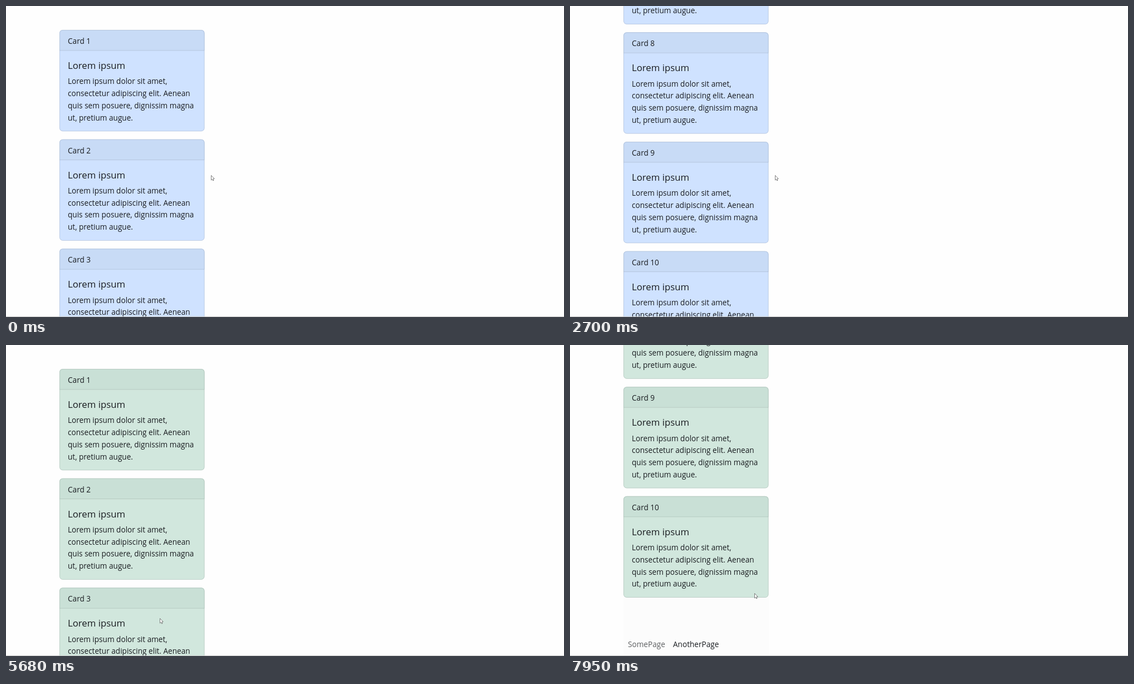
An HTML page that plays this animation: 1002 by 559 pixels, repeating every 8000 ms.

```html
<!DOCTYPE html>
<html lang="en">
<head>
<meta charset="utf-8">
<title>Scrolling cards</title>
<style>
  html, body { margin: 0; width: 100%; height: 100%; overflow: hidden; background: #fefefe; }
  svg { display: block; width: 1002px; height: 559px; font: 13.6px "Open Sans", "Noto Sans", sans-serif; }
  text { fill: #191c20; white-space: pre; }
  .title { font-size: 16.8px; }
  .body { fill: #cfe2ff; }
  .head { fill: #c8dbf6; }
  .green .body { fill: #d1e7dd; }
  .green .head { fill: #c9e0d6; }
  .edge { fill: none; stroke: #000; stroke-opacity: .16; stroke-width: .7; }
  #pointer path { fill: #fff; stroke: #606060; stroke-width: .8; stroke-linejoin: round; }
  #status text { font-size: 8.9px; fill: #fff; }
</style>
</head>
<body>
<svg viewBox="0 0 1002 559">
  <g id="page">
    <g id="footer">
      <rect x="96" y="-89" width="261" height="106" fill="#fcfcfc"/>
      <text x="104">SomePage</text>
      <text x="185">AnotherPage</text>
    </g>
    <g id="cards"></g>
  </g>
  <rect y="558" width="1002" height="1" fill="#c6c6c6"/>
  <g id="status">
    <path d="M0 546H122Q125 546 125 549V559H0Z" fill="#4a4a4a"/>
    <text x="3" y="557.5">devserver:8040/secondsheet</text>
  </g>
  <g id="pointer">
    <path id="arrow" d="M.5 .5V9L2.4 7.4 3.8 10 5 9.4 3.8 6.8 6.2 6.4Z"/>
    <path id="hand" d="M.5 .8Q1.5 -.4 2.2 .8V4L5.2 4.8Q6.4 5.2 6.2 6.6L5.4 10.4H1.4L-1.4 6.8Q-1.2 5.6 .5 6.8Z"/>
    <path id="beam" d="M0 .5H4M2 .5V9.5M0 9.5H4"/>
  </g>
</svg>
<script>
const LOOP = 8000, STEP = 135;
const CARD_TOP = 43, CARD_PITCH = 196.65, LINE_HEIGHT = 21.7, BOTTOM = 1541;
const HOVER = 4000, SWITCH = 4670, SCROLLED = 4790, LEAVE = 5440;

const linear = p => p;
const easeOut = p => 1 - (1 - p) ** 2;
const move = (start, end, from, to, ease = linear) => ({ start, end, from, to, ease });

const scrollMoves = [
  move(810, 1080, [37], [276.5]),
  move(1080, 2010, [276.5], [874.5]),
  move(2010, 2700, [874.5], [1372.2]),
  move(2700, 3000, [1372.2], [BOTTOM]),
  move(SWITCH, 5290, [817.2], [0], easeOut),
  move(6230, 6860, [66], [966]),
  move(7170, 7550, [1060], [BOTTOM])
];
const pointerMoves = [
  move(3370, 3850, [362, 314], [235, 518]),
  move(HOVER, 4360, [233, 527], [231, 536]),
  move(LEAVE, 5680, [237, 530], [276, 491]),
  move(5830, 6080, [312, 462], [396, 401]),
  move(7950, LOOP, [331, 446], [331, 446])
];
const statusMoves = [
  move(HOVER, 4240, [0], [1]),
  move(SWITCH, SCROLLED, [.45], [0])
];

// The latest move that has begun, advanced in held steps of about STEP ms.
function valueAt(moves, t, rest) {
  const current = moves.findLast(m => m.start <= t);
  if (!current) return rest;
  const { start, end, from, to, ease } = current;
  const count = Math.max(1, Math.round((end - start) / STEP));
  const progress = ease(Math.min(1, Math.floor((t - start) / (end - start) * count) / count));
  return from.map((v, i) => v + (to[i] - v) * progress);
}

const byId = id => document.getElementById(id);
const label = (y, text, cls = "") => `<text x="111" y="${y}" class="${cls}">${text}</text>`;
const lines = [
  "Lorem ipsum dolor sit amet,",
  "consectetur adipiscing elit. Aenean",
  "quis sem posuere, dignissim magna",
  "ut, pretium augue."
];
const cardMarkup = n => `<g>
  <rect class="body" x="96" width="260.5" height="182.2" rx="6"/>
  <path class="head" d="M96 37V6Q96 0 102 0H350.5Q356.5 0 356.5 6V37Z"/>
  <path class="edge" d="M96.5 37H356"/>
  <rect class="edge" x="96.4" y=".4" width="259.7" height="181.4" rx="5.6"/>
  ${label(25, "Card " + n)}${label(70, "Lorem ipsum", "title")}
  ${lines.map((text, i) => label(97.4 + LINE_HEIGHT * i, text)).join("")}</g>`;

byId("cards").innerHTML = Array.from({ length: 10 }, (_, i) => cardMarkup(i + 1)).join("");
const cards = [...byId("cards").children];
const [someLink, anotherLink] = byId("footer").querySelectorAll("text");
const shapes = [...byId("pointer").children];

const place = (el, x, y) => el.setAttribute("transform", `translate(${x} ${y})`);

function pointerShape(t) {
  if (t < HOVER || t >= LEAVE) return "arrow";
  return t < SCROLLED ? "hand" : "beam";
}

function draw(t) {
  const [scroll] = valueAt(scrollMoves, t, [0]);
  cards.forEach((card, i) => place(card, 0, CARD_TOP + CARD_PITCH * i - scroll));
  place(byId("footer"), 0, BOTTOM + 543 - scroll);

  const switched = t >= SWITCH;
  byId("page").classList.toggle("green", switched);
  someLink.style.fillOpacity = switched ? .7 : 1;
  anotherLink.style.fillOpacity = switched ? 1 : t >= HOVER ? .82 : .7;

  place(byId("pointer"), ...valueAt(pointerMoves, t, [368, 304]));
  const shape = pointerShape(t);
  shapes.forEach(el => el.style.display = el.id === shape ? "" : "none");
  byId("status").style.opacity = valueAt(statusMoves, t, [0])[0];
}

const start = performance.now();
function tick() {
  draw((performance.now() - start) % LOOP);
  requestAnimationFrame(tick);
}
tick();
</script>
</body>
</html>
```
